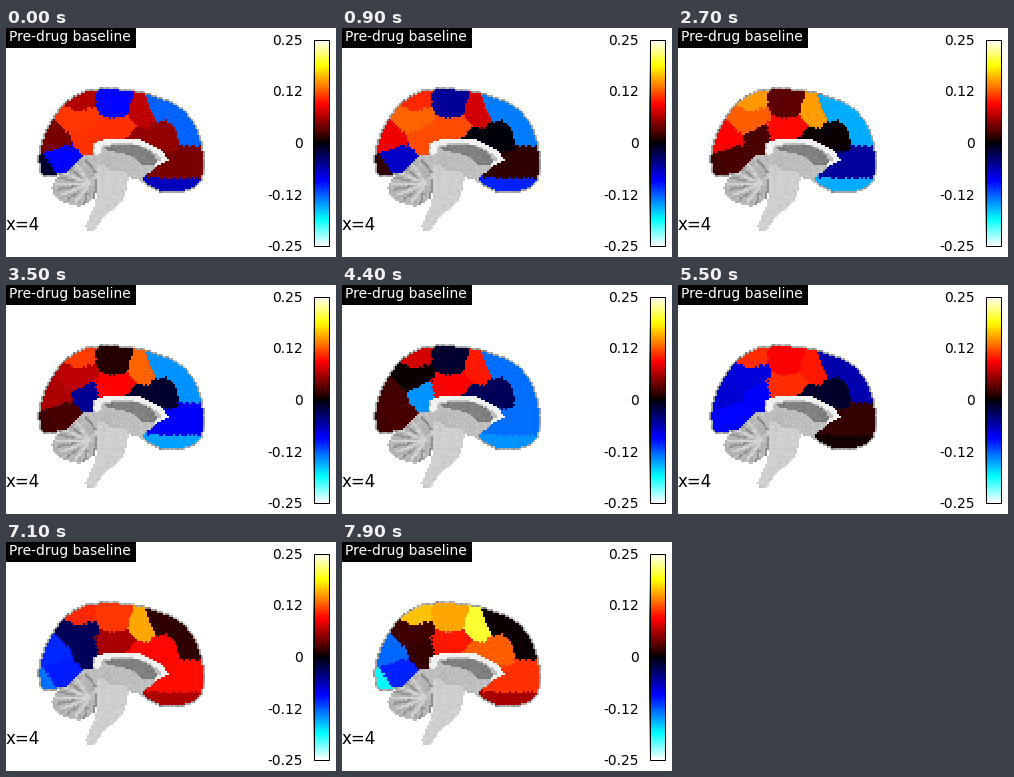
A matplotlib script that plays this animation: 330x229 px, repeating every 8000 ms.

```python
import numpy as np
import matplotlib.pyplot as plt
from matplotlib.animation import FuncAnimation
from matplotlib.colors import ListedColormap
from matplotlib.patches import Rectangle
from matplotlib.path import Path

W, H, DPI = 330, 229, 100
FRAMES, INTERVAL = 80, 100
CELL, X0, Y0, NX, NY = 2, 29, 57, 86, 74
KEYS = [0, 18, 27, 44, 55, 64, 79]

plt.rcParams["font.family"] = "DejaVu Sans"
rng = np.random.default_rng(4)

hot = plt.cm.hot(np.linspace(0, 1, 128))[:, :3]
cold_hot = ListedColormap(np.vstack([hot[::-1, ::-1], hot]))

gx, gy = np.meshgrid(X0 + CELL * (np.arange(NX) + 0.5),
                     Y0 + CELL * (np.arange(NY) + 0.5))
cells = np.stack([gx, gy], axis=-1)


def smooth(points, closed=True, steps=8):
    """Catmull-Rom curve through the points."""
    p = np.array(points, float)
    p = np.vstack([p[-1], p, p[:2]] if closed else [p[0], p, p[-1]])
    t = np.linspace(0, 1, steps, endpoint=False)[:, None]
    parts = [b + t / 2 * (c - a + t * (2 * a - 5 * b + 4 * c - d
                                       + t * (3 * (b - c) + d - a)))
             for a, b, c, d in zip(p, p[1:], p[2:], p[3:])]
    return np.vstack(parts + [p[-2]])


def inside(outline):
    return Path(outline).contains_points(cells.reshape(-1, 2)).reshape(NY, NX)


# Anatomy: grey levels on the voxel grid, white outside the head
gray = np.full((NY, NX), 255.0)
noise = rng.normal(0, 1, (NY, NX))


def tissue(mask, level, grain=5):
    gray[mask] = level + grain * noise[mask]


def strand(curve, level, width=1.2):
    near = np.full((NY, NX), np.inf)
    for a, b in zip(curve, curve[1:]):
        d = np.subtract(b, a)
        t = np.clip((cells - a) @ d / (d @ d), 0, 1)
        near = np.minimum(near, np.linalg.norm(cells - a - t[..., None] * d, axis=-1))
    tissue(near < width, level, 3)


head = inside(smooth([(37, 149), (32, 128), (40, 101), (57, 76), (80, 62),
                      (112, 60), (142, 65), (172, 77), (190, 97), (198, 124),
                      (197, 150), (183, 163), (158, 165), (140, 157),
                      (126, 150), (90, 150), (58, 147)]))
under = inside([(50, 150), (62, 144), (77, 128), (87, 126), (88, 115),
                (104, 110), (135, 112), (155, 122), (163, 132), (150, 139),
                (138, 149), (136, 170), (50, 170)])
tissue(head, 165, 16)
tissue(head & under, 190)

# Cerebellum with fanned folds
cx, cy = 84, 156
tissue(inside(smooth([(46, 160), (56, 145), (77, 132), (90, 148), (88, 168),
                      (74, 178), (54, 172)])), 182, 7)
for k, angle in enumerate(np.linspace(1.75, 4.3, 10)):
    tip = np.array([cx + 33 * np.cos(angle), cy + 21 * np.sin(angle)])
    start = (cx, cy) if k % 2 else (tip + (cx, cy)) / 2
    strand([start, tip], 210 if k % 2 else 148)
strand(smooth([(79, 131), (90, 147), (88, 170)], closed=False), 142)

# Brainstem, ventricle, thalamus, corpus callosum
tissue(inside(smooth([(92, 138), (117, 143), (122, 153), (115, 174),
                      (99, 188), (87, 203), (80, 198), (90, 172)])), 207, 4)
tissue(inside(smooth([(99, 121), (118, 116), (140, 121), (151, 134),
                      (137, 137), (122, 127)])), 128, 6)
tissue(inside(smooth([(96, 127), (116, 125), (132, 134), (118, 143), (102, 141)])), 188)
strand(smooth([(91, 123), (95, 115), (117, 112), (137, 115), (152, 123),
               (159, 131), (153, 137)], closed=False), 242, 3.2)

# Cortex: the head without a one-cell rim, split by nearest site
cortex = head & ~under
for axis in (0, 1):
    for shift in (-1, 1):
        cortex &= np.roll(head, shift, axis)

# Sites of each parcel and its activity (percent) at KEYS
parcels = [
    # medial, orbital and anterior cingulate
    ([(152, 78), (176, 88), (186, 102)], [-51, -59, -62, -53, -25, 10, 0]),
    ([(158, 140), (184, 134)], [17, -6, -22, -53, 7, 35, 44]),
    ([(156, 160), (182, 166)], [-27, -56, -62, -58, 2, 25, 24]),
    ([(130, 114), (156, 108)], [21, -22, 0, -12, -5, 28, 50]),
    # motor strip and middle cingulate
    ([(138, 84)], [27, 33, 60, 40, 40, 47, 79]),
    ([(107, 77)], [-37, -6, 13, -6, 36, 32, 61]),
    ([(98, 103), (114, 103)], [44, 52, 38, 36, 43, 10, 40]),
    # parietal
    ([(72, 74)], [25, 60, 59, 30, 43, 24, 65]),
    ([(62, 90), (78, 92)], [45, 57, 50, 0, -32, -28, 8]),
    ([(84, 107)], [44, 52, 10, -58, -36, -28, 7]),
    # occipital
    ([(48, 106)], [17, 52, 37, 9, -30, -35, -52]),
    ([(56, 134)], [-37, -20, 10, 10, -37, -40, -42]),
    ([(38, 146)], [-6, 18, 8, 8, -37, -36, -74]),
]
ragged = cells + rng.normal(0, 0.7, cells.shape)
reach = [np.min([np.linalg.norm(ragged - s, axis=-1) for s in sites], axis=0)
         for sites, _ in parcels]
label = np.argmin(reach, axis=0)[cortex]
levels = np.array([course for _, course in parcels]) / 100
base = np.repeat(np.clip(gray, 0, 255)[..., None] / 255, 3, axis=2)


def activity(i):
    k = min(np.searchsorted(KEYS, i, side="right") - 1, len(KEYS) - 2)
    t = (i - KEYS[k]) / (KEYS[k + 1] - KEYS[k])
    t = t * t * (3 - 2 * t)
    return levels[:, k] * (1 - t) + levels[:, k + 1] * t


def brain(i):
    img = base.copy()
    img[cortex] = cold_hot((activity(i) + 1) / 2)[label, :3]
    return img


fig = plt.figure(figsize=(W / DPI, H / DPI), dpi=DPI, facecolor="white")
ax = fig.add_axes([0, 0, 1, 1])
ax.axis("off")
slice_im = ax.imshow(brain(0), interpolation="nearest", aspect="auto",
                     extent=(X0, X0 + CELL * NX, Y0 + CELL * NY, Y0))

LEFT, TOP, BOTTOM = 307, 11.5, 218
ax.imshow(np.linspace(1, 0, 256)[:, None], cmap=cold_hot, aspect="auto",
          interpolation="nearest", extent=(LEFT, LEFT + 16, BOTTOM, TOP))
ax.add_patch(Rectangle((LEFT + 0.5, TOP), 15, BOTTOM - TOP,
                       fill=False, ec="black", lw=0.72))
for n, tick in enumerate(["0.25", "0.12", "0", "-0.12", "-0.25"]):
    y = TOP + n * (BOTTOM - TOP) / 4
    ax.text(LEFT - 10.5, y + 5.3, tick, size=10, ha="right", va="baseline")

ax.add_patch(Rectangle((0, 0), 130, 20, fc="black", lw=0))
ax.text(3, 13, "Pre-drug baseline", size=10, color="white", va="baseline")
ax.text(0, 202.5, "x=4", size=12, va="baseline")
ax.set_xlim(0, W)
ax.set_ylim(H, 0)


def update(i):
    slice_im.set_data(brain(i))
    return [slice_im]


anim = FuncAnimation(fig, update, frames=FRAMES, interval=INTERVAL,
                     repeat=True, repeat_delay=0, blit=False)
plt.show()
```
